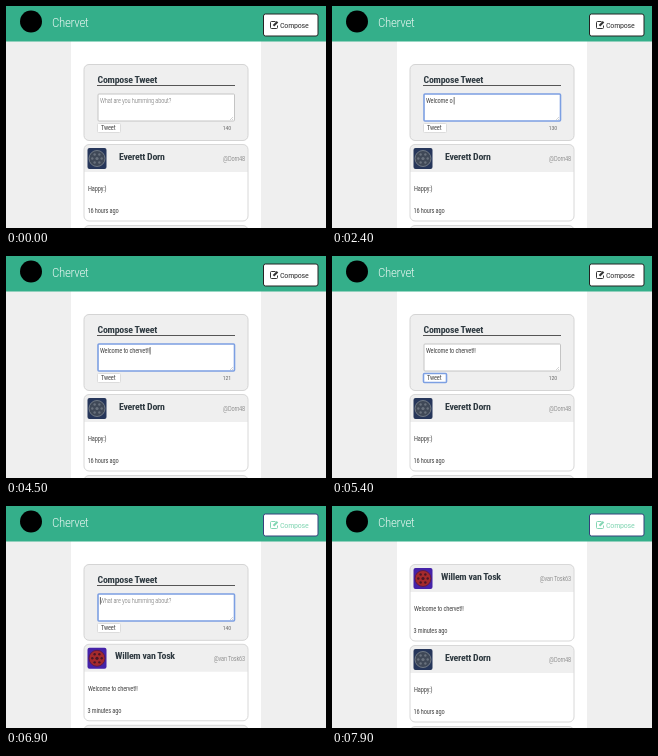
An HTML page that plays this animation: 320x222 px, repeating every 8000 ms.

```html
<!DOCTYPE html>
<html lang="en">
<head>
<meta charset="utf-8">
<title>Chervet</title>
<style>
html, body { margin: 0; width: 100%; height: 100%; overflow: hidden; background: #efefef; }
svg { display: block; width: 320px; height: 222px; }
text { font: 6.4px "Roboto Condensed", Roboto, sans-serif; letter-spacing: -.025em; fill: #484848; white-space: pre; }
.title { font-size: 13px; font-weight: 300; fill: #e4f5ef; }
.head { font-size: 9.9px; font-weight: 700; fill: #2f3a41; }
.light { font-weight: 300; fill: #707070; }
.count { font-size: 5.8px; fill: #6c6c6c; }
.end { text-anchor: end; }
.panel { fill: #efefef; stroke: #d4d4d4; }
.field { fill: #fff; stroke: #c4c4c4; }
.button { stroke: #dcdcdc; }
.field.focus { stroke: #7c9fe2; stroke-width: 1.6; }
#compose text { font-size: 8px; fill: currentColor; }
</style>
</head>
<body>
<svg viewBox="0 0 320 222">
  <defs>
    <clipPath id="fold"><rect id="foldBox" x="77" y="58" width="166" height="77"/></clipPath>
  </defs>
  <path d="M65 35h190v187H65z" fill="#fff"/>

  <g id="composer">
    <rect id="panel" class="panel" x="78" y="58.5" width="164" height="76" rx="5"/>
    <g clip-path="url(#fold)">
      <text class="head" x="91.5" y="76.5">Compose Tweet</text>
      <path d="M91 79.5h138" stroke="#555"/>
      <rect id="area" class="field" x="92" y="88" width="136.5" height="27" rx="1"/>
      <path d="M224 114l3-3M226 114l1-1" stroke="#aaa" stroke-width=".5"/>
      <text id="hint" class="light" x="94" y="96.7">What are you humming about?</text>
      <text id="typed" x="94" y="96.7"></text>
      <path id="caret" d="M0 91v7.5" stroke="#333" stroke-width=".7"/>
      <rect id="send" class="field button" x="91.5" y="117.5" width="23" height="9" rx="1"/>
      <text x="95" y="124.3">Tweet</text>
      <text id="count" class="count end" x="225" y="124.3"></text>
    </g>
  </g>
  <g id="fresh"></g>
  <g id="older"></g>

  <path d="M0 0h320v35.4H0z" fill="#34af8a"/>
  <circle cx="25" cy="15.5" r="11" fill="#000"/>
  <text class="title" x="46" y="21">Chervet</text>
  <g id="compose">
    <rect id="composeBox" x="257.5" y="8" width="54.5" height="22" rx="2" fill="#fff"/>
    <path d="M269.5 15.5h-4q-1 0-1 1v5q0 1 1 1h5q1 0 1-1v-2" fill="none" stroke="currentColor"/>
    <path d="M267.5 19.8l4-4" stroke="currentColor" stroke-width="2.2"/>
    <text x="274" y="22">Compose</text>
  </g>
</svg>
<script>
const $ = id => document.getElementById(id);
const LOOP = 8000, FOCUS = 500, BLUR = 5300, POST = 5600, AVATAR = 6000,
      HOVER = 6400, CLICK = 6850, FOLD = 6888, FOLD_TIME = 400;
const keys = "Welcome o <<to chervet!!";
const keyTimes = [8, 10, 12, 13, 14, 16, 17, 18, 20, 21, 25, 26, 28, 30, 32, 33,
                  34, 35, 36, 38, 39, 40, 43, 45].map(n => n * 100);

function avatar(back, disc, rim, mark) {
  const dots = Array.from({ length: 6 }, (_, i) => {
    const a = i * Math.PI / 3;
    return `<circle cx="${91 + 4.7 * Math.cos(a)}" cy="${14.5 + 4.7 * Math.sin(a)}" r="1.2"/>`;
  }).join("");
  return `<g class="avatar"><rect x="81.5" y="4" width="19" height="21" rx="2" fill="${back}"/>
    <circle cx="91" cy="14.5" r="8" fill="${disc}" stroke="${rim}"/>
    <g fill="${mark}"><circle cx="91" cy="14.5" r="1.6"/>${dots}</g></g>`;
}

function card(y, picture = "", name = "", nameX = 0, handle = "", body = "", age = "") {
  return `<g transform="translate(0 ${y})">
    <rect x="78" y=".5" width="164" height="76.5" rx="5" fill="#fff"/>
    <path d="M78 28V5.5q0-5 5-5h154q5 0 5 5V28z" fill="#efefef"/>
    <rect x="78" y=".5" width="164" height="76.5" rx="5" fill="none" stroke="#d8d8d8"/>
    ${picture}
    <text class="head" x="${nameX}" y="15.5">${name}</text>
    <text class="light end" x="239" y="17">${handle}</text>
    <text x="82" y="47.3">${body}</text>
    <text x="81.5" y="69">${age}</text></g>`;
}

$("fresh").innerHTML = card(0, avatar("#4522a8", "#a52a2c", "#5c1a4c", "#4a1626"),
  "Willem van Tosk", 109, "@van Tosk63", "Welcome to chervet!!", "3 minutes ago");
$("older").innerHTML = card(0, avatar("#26365a", "#3f4857", "#707985", "#6a727e"),
  "Everett Dorn", 113, "@Dorn48", "Happy:)", "16 hours ago") + card(81);
const freshAvatar = $("fresh").querySelector(".avatar");

function textAt(t) {
  let s = "";
  if (t < POST) keyTimes.forEach((k, i) => {
    if (k <= t) s = keys[i] === "<" ? s.slice(0, -1) : s + keys[i];
  });
  return s;
}

const show = (el, on) => el.setAttribute("visibility", on ? "inherit" : "hidden");
const moveY = (el, y) => el.setAttribute("transform", `translate(0 ${y})`);

function draw(t) {
  const text = textAt(t), posted = t >= POST, clicked = t >= CLICK;
  const focused = t >= FOCUS && t < BLUR || clicked;
  $("typed").textContent = text;
  // The counter follows on key release.
  $("count").textContent = 140 - textAt(posted ? t : t - 80).length;
  show($("hint"), !text);
  $("area").classList.toggle("focus", focused);
  $("send").classList.toggle("focus", t >= BLUR && !clicked);

  const lastInput = clicked ? CLICK : Math.max(FOCUS, ...keyTimes.filter(k => k <= t));
  show($("caret"), focused && (t - lastInput) % 1000 < 500);
  const width = text ? $("typed").getComputedTextLength() : 0;
  $("caret").setAttribute("transform", `translate(${94.4 + width} 0)`);

  const p = Math.min(1, Math.max(0, (t - FOLD) / FOLD_TIME));
  const open = (1 + Math.cos(Math.PI * p)) / 2;
  show($("composer"), p < 1);
  $("panel").setAttribute("height", 76 * open);
  $("foldBox").setAttribute("height", 76.5 * open);

  const top = 58 + 80 * open;
  show($("fresh"), posted);
  show(freshAvatar, t >= AVATAR);
  moveY($("fresh"), top);
  moveY($("older"), top + (posted ? 81 : 0));

  $("compose").style.color = t >= HOVER ? "#84d6b4" : "#333";
  $("composeBox").setAttribute("stroke", clicked ? "#34407a" : "#222");
}

const start = performance.now();
(function frame() {
  draw((performance.now() - start) % LOOP);
  requestAnimationFrame(frame);
})();
</script>
</body>
</html>
```
